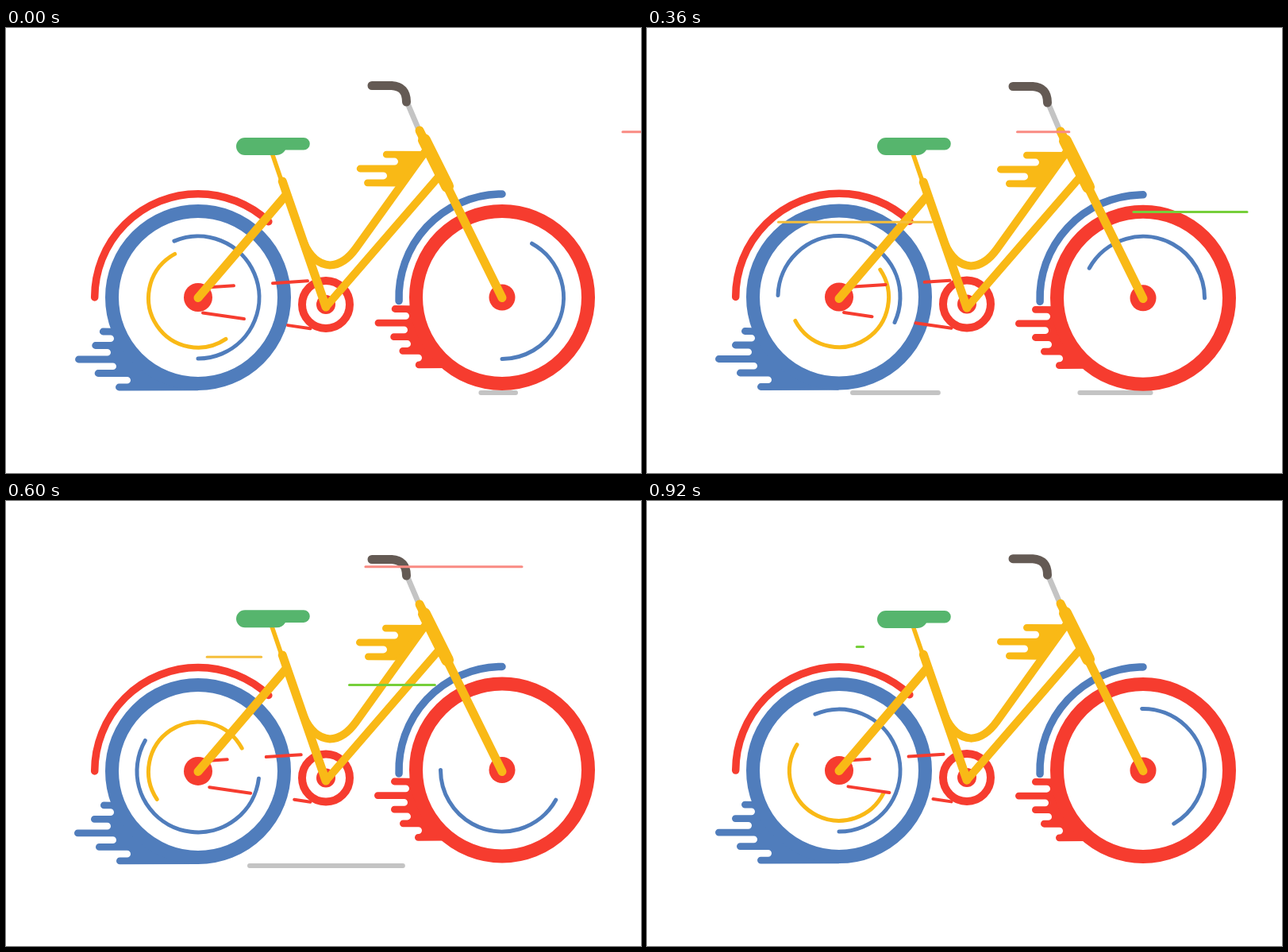
An HTML page with a canvas for the animation above (960 ms loop, 800 by 560 pixels).

```html
<!DOCTYPE html>
<html lang="en">
<head>
<meta charset="utf-8">
<title>Bicycle</title>
<style>
html, body { margin: 0; width: 100%; height: 100%; overflow: hidden; background: #fff; }
canvas { display: block; width: 800px; height: 560px; }
</style>
</head>
<body>
<canvas id="stage" width="800" height="560"></canvas>
<script>
const c = document.getElementById('stage').getContext('2d');
const STEP = 40, STEPS = 24, RAD = Math.PI / 180;
const BLUE = '#507dbc', RED = '#f63c2f', YELLOW = '#f9b916', GREEN = '#56b56d',
  GREY = '#c4c4c4', DARK = '#645a54', PINK = '#f98b83', LIME = '#76cf3a', GOLD = '#f5bf3c';

c.lineCap = 'round';
c.lineJoin = 'round';

const mod = (a, m) => ((a % m) + m) % m;
const clamp = (a, lo, hi) => Math.min(Math.max(a, lo), hi);
const after = (t, start) => Math.max(t - start, 0);

function stroke(path, color, width) {
  c.strokeStyle = color;
  c.lineWidth = width;
  c.stroke(new Path2D(path));
}
function arc(x, y, r, from, to, color, width) {
  c.strokeStyle = color;
  c.lineWidth = width;
  c.beginPath();
  c.arc(x, y, r, from * RAD, to * RAD);
  c.stroke();
}
function disc(x, y, r, color) {
  c.fillStyle = color;
  c.beginPath();
  c.arc(x, y, r, 0, 7);
  c.fill();
}
function shifted(dy, draw) {
  c.save();
  c.translate(0, dy);
  draw();
  c.restore();
}

// Speed flames: rounded bars with rounded notches between them.
const rearFlame = {
  color: BLUE, y: 382, pitch: 17.5, from: [142, 378], to: [242, 456.2],
  bars: [119, 107, 86, 113, 139], gaps: [136, 132, 139, 157], sway: 16, phase: -0.75
};
const frontFlame = {
  color: RED, y: 353.5, pitch: 17.6, from: [520, 349.5], to: [556, 428],
  bars: [485, 464, 485, 496, 515], gaps: [508, 506, 510, 524], sway: 9, phase: 0.85
};
const frameFlame = {
  color: YELLOW, y: 159.2, pitch: 17.8, from: [532, 155], to: [496, 199.5],
  bars: [474, 441, 452], gaps: [494, 480], sway: 11, phase: 0.85
};
function flame(f, n) {
  const q = Math.PI / 2, r = 4.4, g = f.pitch / 2 - r;
  const gust = f.sway * Math.exp(-(((n - 3) / 2) ** 2));
  c.fillStyle = f.color;
  c.beginPath();
  c.moveTo(...f.from);
  f.bars.forEach((x, i) => {
    const y = f.y + i * f.pitch;
    c.arc(x + gust * Math.sin(f.phase + 1.6 * i) + r, y, r, -q, q, true);
    if (i < f.gaps.length) c.arc(f.gaps[i] - g, y + f.pitch / 2, g, -q, q);
  });
  c.lineTo(...f.to);
  c.fill();
}

// Long passing line: drifts left while its head grows out, then its tail catches up.
function glide(t) {
  const drift = 571 - 26 * Math.min(t, 7) - 24 * after(t, 7.9);
  return t < 1.6 ? [0, 0] : [drift - 27 * clamp(t + 0.3, 0, 7.3), drift - 42.5 * after(t, 8.9)];
}
// Short passing line: pops out, then races off to the left.
function dart(t) {
  return t < 0.3 ? [0, 0] : [414 - 37 * Math.min(t, 2) - 62 * after(t, 2.6), 414 - 77 * after(t, 2.8)];
}
function streak(motion, t, dx, y, color, width = 3, edge = 900) {
  const [head, tail] = motion(t);
  const right = Math.min(tail + dx, edge);
  if (tail > head && right > head + dx) stroke(`M${head + dx} ${y}H${right}`, color, width);
}

// Dashes running along one straight side of the chain.
function chain(x0, y0, x1, y1, start, length, period) {
  const yAt = x => y0 + (y1 - y0) * (x - x0) / (x1 - x0);
  for (let x = x0 + mod(start - x0, period) - period; x < x1; x += period) {
    const a = Math.max(x, x0), b = Math.min(x + length, x1);
    if (b > a) stroke(`M${a} ${yAt(a)}L${b} ${yAt(b)}`, RED, 4);
  }
}

function wheel(x, color) {
  disc(x, 339, 104, '#fff');
  arc(x, 339, 108.5, 0, 360, color, 17);
}

function rearWheel(n) {
  const turn = n * 30;
  const outer = n <= 11 ? n * 360 / 11 : (n - 11) * 30;
  flame(rearFlame, n);
  arc(242, 339, 130.3, 180, 313, RED, 9.5);
  wheel(242, BLUE);
  arc(242, 339, 77, outer - 113, outer + 90, BLUE, 5);
  arc(242, 339.6, 62.5, turn + 56, turn + 242, YELLOW, 5);
  disc(242, 339, 18, RED);
}

function drive(n) {
  chain(248, 326.8, 381.5, 318.2, 243 + n * 11.85, 44, 93);
  chain(248, 358.5, 383.5, 378.3, 248 - n * 13.72, 52, 107);
  arc(403, 348, 30, 0, 360, RED, 10);
  disc(403, 348, 12, RED);
}

function frontWheel(n) {
  const turn = n * 30;
  flame(frontFlame, n);
  arc(625, 339, 130, 178, 270, BLUE, 9.5);
  wheel(625, RED);
  arc(625, 339, 77.5, turn - 61, turn + 90, BLUE, 5);
  disc(625, 339, 16.5, RED);
}

function frame(n) {
  stroke('M335 157L348 195', YELLOW, 5.5);
  stroke('M506 95L520 128', GREY, 7);
  stroke('M461 72.5H486Q504.5 73.5 504.5 93', DARK, 11);
  flame(frameFlame, n);
  stroke('M242 339.5L353 210', YELLOW, 11);
  stroke('M530 153L441 277Q426 298 408 298.5Q387 297 375 270', YELLOW, 10);
  stroke('M403 351L546 186', YELLOW, 10);
  stroke('M348.3 193L403 351', YELLOW, 11);
  stroke('M521 129L625 339.5', YELLOW, 11);
  stroke('M527 141L556 199', YELLOW, 16);
}

function seat() {
  c.fillStyle = GREEN;
  c.fill(new Path2D('M301 138H375A7.8 7.8 0 0 1 375 153.6H352Q348 160 341 160H301A11 11 0 0 1 301 138Z'));
}

function draw(n) {
  const bob = (1 - Math.cos(n * Math.PI / 6)) / 2;
  const bounce = (early, late) => bob * (n < 12 ? early : late);
  c.fillStyle = '#fff';
  c.fillRect(0, 0, 800, 560);

  for (const start of [-2, 6]) streak(glide, n - start, 141.5, 459, GREY, 6, 642);

  shifted(bounce(-1, 1.8), () => rearWheel(n));
  shifted(bounce(-1, 0.9), () => drive(n));
  shifted(bounce(1.6, -1), () => frontWheel(n));
  shifted(bounce(2, 2), () => frame(n));
  shifted(bounce(0, -1.4), seat);

  streak(glide, n + 3, 373, 130.7, PINK);
  streak(glide, n - 8, 261, 82.7, PINK);
  streak(glide, n, 0, 244.3, GOLD);
  streak(dart, n - 11, 0, 196.3, GOLD);
  streak(glide, n - 4, 315, 231.5, LIME);
  streak(dart, n - 15, 259, 183.5, LIME);
}

const begin = performance.now();
function tick() {
  draw(Math.floor((performance.now() - begin) / STEP) % STEPS);
  requestAnimationFrame(tick);
}
tick();
</script>
</body>
</html>
```
